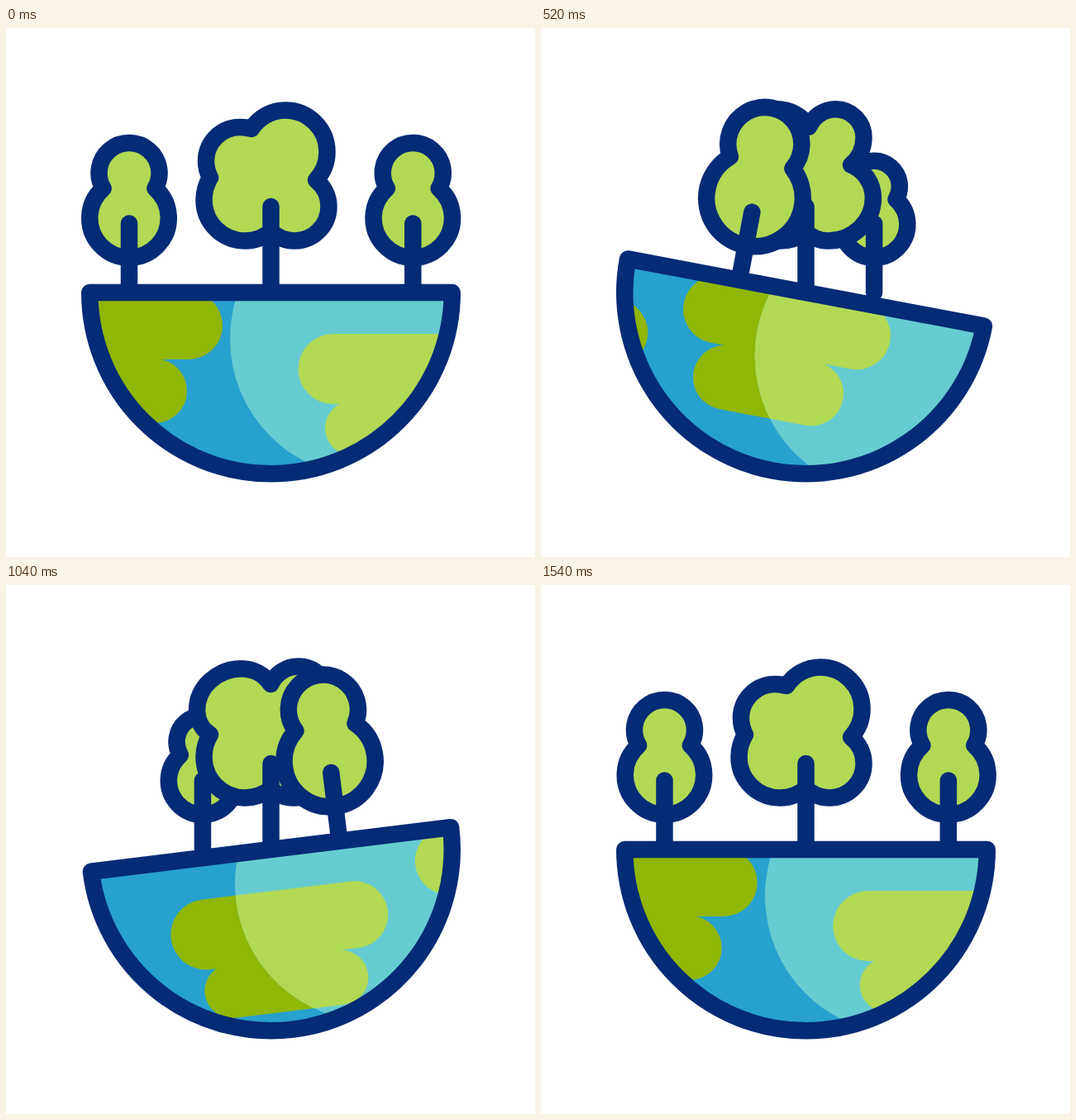
Write an HTML page that moves like this. It is 640 px wide and 640 px high and loops after 1560 ms.

```html
<!DOCTYPE html>
<html lang="en">
<head>
<meta charset="utf-8">
<title>Spinning half globe with trees</title>
<style>
  html, body { margin: 0; width: 100%; height: 100%; overflow: hidden; background: #fff; }
  svg { display: block; width: 100vw; height: 100vh; }
  .ink { stroke: #042b76; stroke-width: 20.5; stroke-linecap: round; stroke-linejoin: round; }
  .leaf { fill: #b1d953; }
</style>
</head>
<body>
<svg viewBox="0 0 640 640">
  <defs>
    <path id="bowl" d="M101.25 320H539.75A219.25 219.25 0 0 1 101.25 320Z"/>
    <clipPath id="inside"><use href="#bowl"/></clipPath>
    <clipPath id="lit"><circle cx="438" cy="376" r="167"/></clipPath>
    <path id="land"/>
  </defs>

  <g id="back" class="ink"><path class="leaf"/><path d="M0 236.5V320"/></g>
  <g class="ink"><path id="crown" class="leaf"/><path d="M320.5 216V320"/></g>

  <g id="globe">
    <g id="front" class="ink"><path class="leaf"/><path d="M0 236.5V320"/></g>
    <g clip-path="url(#inside)">
      <rect x="80" y="300" width="480" height="260" fill="#27a1ce"/>
      <use href="#land" fill="#90b606"/>
      <g clip-path="url(#lit)">
        <rect x="80" y="300" width="540" height="260" fill="#67ccd1"/>
        <use href="#land" fill="#b1d953"/>
      </g>
    </g>
    <use href="#bowl" class="ink" fill="none"/>
  </g>
</svg>
<script>
const LOOP = 1560;
const $ = id => document.getElementById(id);
const smooth = u => u * u * (3 - 2 * u);
const mix = (a, b, u) => a + (b - a) * u;
const n = v => v.toFixed(2);

// Eased 0 -> 1 -> 0 over the loop
const pulse = (t, peak) => smooth(t < peak ? t / peak : (LOOP - t) / (LOOP - peak));

// Rocking of the globe: [time, degrees]
const ROCK = [[0, 0], [565, 10.85], [1060, -7.1], [1300, 0], [LOOP, 0]];
function tilt(t) {
  const i = ROCK.findIndex((k, j) => j > 0 && t <= k[0]);
  const [t0, a] = ROCK[i - 1], [t1, b] = ROCK[i];
  return mix(a, b, smooth((t - t0) / (t1 - t0)));
}

// Two stacked circles, scaled from their base
function smallCrown(s) {
  const base = 277.75, y = n(base - 83.7 * s), x = n(31.4 * s);
  const head = n(36.5 * s), body = n(47.75 * s);
  return `M-${x} ${y}A${head} ${head} 0 1 1 ${x} ${y}A${body} ${body} 0 1 1 -${x} ${y}Z`;
}

function placeTree(id, x, s) {
  const g = $(id);
  g.setAttribute("transform", `translate(${n(x)} 0)`);
  g.firstElementChild.setAttribute("d", smallCrown(s));
}

// Each lobe: two extreme points, then the notch after it, at rest and at full swell
const LOBES = [
  [[242, 161, 226, 147], [283, 120, 286, 92.75], [297, 122, 331, 119]],
  [[338, 99.5, 361, 98], [388.5, 150, 391, 128], [375, 184, 375, 161]],
  [[390.5, 216, 404.7, 203], [349, 257.5, 347, 257.5], [320.5, 246, 320.5, 247]],
  [[289, 257.5, 289, 257.5], [239.5, 208, 239.5, 208], [247, 181, 247, 181]]
];

function bigCrown(m) {
  const at = p => [mix(p[0], p[2], m), mix(p[1], p[3], m)];
  const arc = (rx, ry, p) => `A${n(rx)} ${n(ry)} 0 0 1 ${n(p[0])} ${n(p[1])}`;
  // Radius of the circle touching its extreme e and passing through p
  const radius = (e, p, axis) =>
    ((e[0] - p[0]) ** 2 + (e[1] - p[1]) ** 2) / (2 * Math.abs(e[axis] - p[axis]));
  let from = [247, 181];
  let d = "M" + from;
  LOBES.forEach((lobe, i) => {
    const [a, b, to] = lobe.map(at);
    const r1 = radius(a, from, i % 2), r2 = radius(b, to, 1 - i % 2);
    d += arc(r1, r1, a) + arc(Math.abs(b[0] - a[0]), Math.abs(b[1] - a[1]), b) + arc(r2, r2, to);
    from = to;
  });
  return d + "Z";
}

// Rounded bar between two cap centres
const bar = (x1, x2, y, r) =>
  `M${n(x1)} ${y - r}H${n(x2)}A${r} ${r} 0 0 1 ${n(x2)} ${y + r}H${n(x1)}A${r} ${r} 0 0 1 ${n(x1)} ${y - r}Z`;

const north = x => bar(x - 172, x, 360, 41) + bar(x - 147, x - 41, 439, 39);
const south = x => bar(x, x + 60, 412.5, 42.5) + bar(x + 40, x + 181.5, 410.5, 40.5) +
  bar(x + 23, x + 156, 484, 33);

function draw(t) {
  const go = smooth(t / LOOP);
  const out = 652 * go, come = 643 * (go - 1);

  $("globe").setAttribute("transform", `rotate(${n(tilt(t))} 320.5 320)`);
  $("land").setAttribute("d",
    north(221 + out) + north(221 + come) + south(396 + out) + south(396 + come));
  $("crown").setAttribute("d", bigCrown(pulse(t, 730)));
  placeTree("front", mix(149, 493, go), 1 + 0.25 * pulse(t, 660));
  placeTree("back", mix(492.3, 149.3, go), 1 - 0.2 * pulse(t, 740));
}

const start = performance.now();
function tick() {
  draw((performance.now() - start) % LOOP);
  requestAnimationFrame(tick);
}
tick();
</script>
</body>
</html>
```
